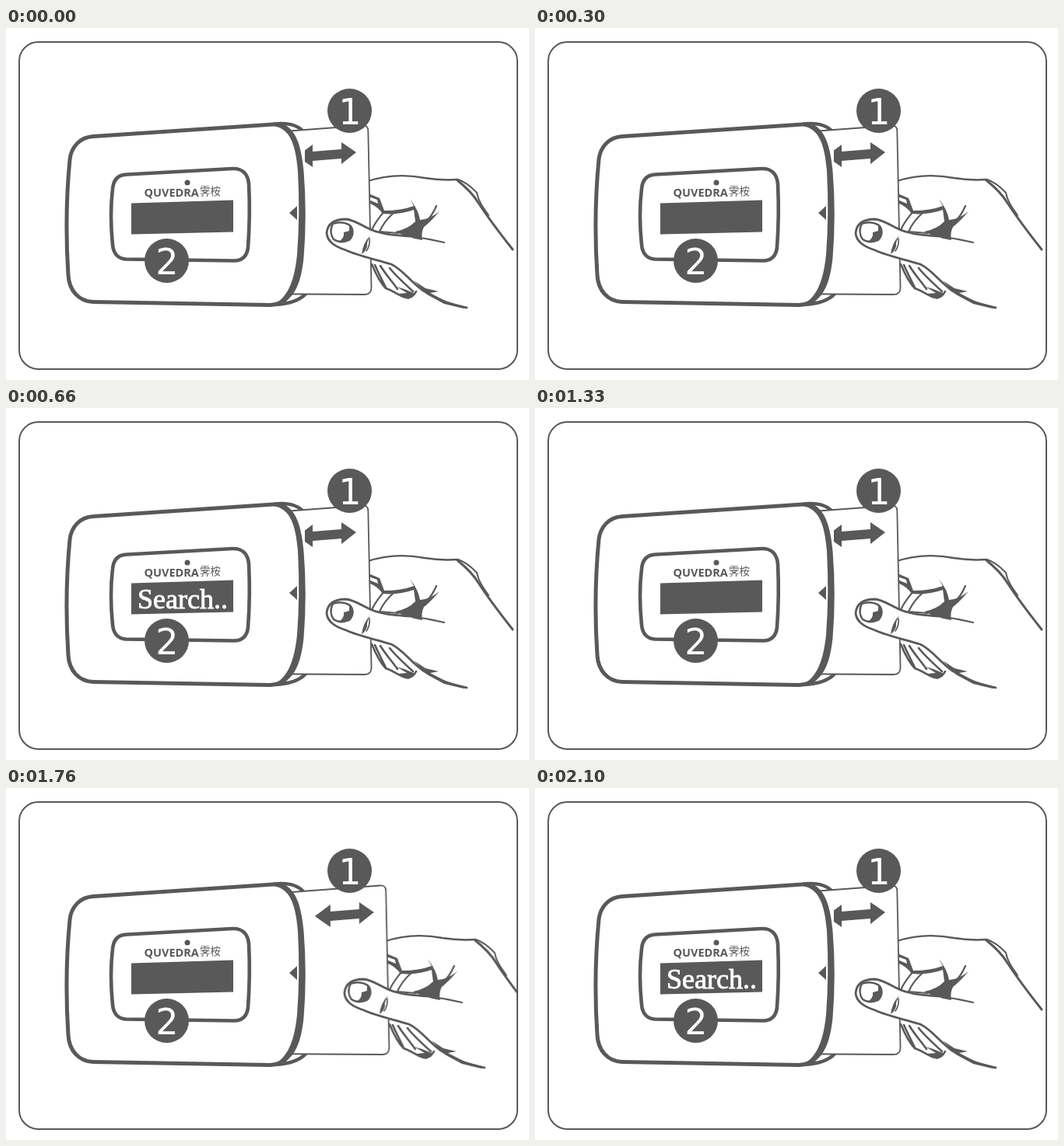
An HTML page for the animation above (2.97 s loop, 672 by 453 pixels).

```html
<!DOCTYPE html>
<html lang="en">
<head>
<meta charset="utf-8">
<title>Card reader guide</title>
<style>
  :root { --ink: #595959; --loop: 2970ms; }
  html, body { margin: 0; width: 100%; height: 100%; overflow: hidden; background: #fff; }
  svg { display: block; width: 100%; height: 100%; }

  .line { fill: none; stroke: var(--ink); stroke-linecap: round; stroke-linejoin: round; }
  .body { fill: #fff; stroke: var(--ink); stroke-linejoin: round; }
  .solid { fill: var(--ink); }
  .digit { font: 46px "DejaVu Sans", Verdana, sans-serif; fill: #fff; text-anchor: middle; }
  .brand { font: bold 14.5px "Open Sans", sans-serif; fill: var(--ink); }
  .brand-cjk { font: 500 13.5px "Noto Sans CJK SC", "Noto Sans CJK", sans-serif; fill: var(--ink); }
  .status {
    font: 36px "Liberation Serif", "Times New Roman", serif;
    fill: #fff; stroke: #fff; stroke-width: .9;
    animation: status var(--loop) -1ms step-end infinite;
  }
  .slide { animation: slide var(--loop) -1ms infinite; }

  /* Two pulls, a pause, then two more; each moves in 30 ms ticks. */
  @keyframes slide {
    0%, 10.101%, 58.2492% { transform: translateX(0); animation-timing-function: steps(5); }
    5.0505%, 15.1515%, 63.2997% { transform: translateX(114px); animation-timing-function: steps(5); }
    20.202% { transform: translateX(0); }
    47.138% { transform: translateX(0); animation-timing-function: steps(5); }
    52.1886% { transform: translateX(114px); animation-timing-function: steps(6); }
    68.3502%, 100% { transform: translateX(0); }
  }
  @keyframes status {
    0%, 44.7811% { opacity: 0; }
    21.2121%, 69.3603% { opacity: .5; }
    22.2222%, 70.7071% { opacity: 1; }
    100% { opacity: 0; }
  }
</style>
</head>
<body>
<svg viewBox="0 0 672 453" preserveAspectRatio="none">
  <defs>
    <clipPath id="stage"><rect width="656" height="453"/></clipPath>
    <clipPath id="slot"><rect x="384" width="272" height="453"/></clipPath>
  </defs>
  <rect width="672" height="453" fill="#fff"/>
  <rect class="line" x="17" y="18" width="640" height="421" rx="24.5" stroke-width="2"/>

  <!-- rear rim -->
  <path class="body" stroke-width="4.5" d="M345 123.500C366 121.500 378 126 386 138L385 342C378 350 363 355 345 356Z"/>

  <g clip-path="url(#stage)">
    <g class="slide">
      <!-- hand behind the card -->
      <path fill="#fff" d="M460 198Q500 186 545 193L578 196L606 213L651 285L592 360L540 342L518 348L474 320Z"/>
      <path class="line" stroke-width="2.400" d="M462 198C488 189 512 188 538 193C556 196 567 196 580 195"/>
      <path class="line" stroke-width="3" d="M580 196C590 204 599 212 607 225C620 245 636 266 651 285"/>
      <path class="line" stroke-width="2" d="M581 195C593 199 600 207 605 212C607 223 613 231 620 241"/>

      <!-- folded fingers -->
      <path class="solid" d="M466 213L480 219L486 235Q508 235 524 229L519 220Q530 234 532 247Q545 246 557 236Q545 250 537 256Q533 264 535 273Q516 270 500 262Q516 259 526 249L524 234Q504 241 484 239Q478 230 466 225V221L478 226L477 221L466 217Z"/>
      <path class="line" stroke-width="2.200" d="M485 237C479 245 474 250 470 260M498 238C490 245 484 253 480 262L504 264M553 229C549 238 545 244 540 249M520 268Q542 271 563 276"/>
      <path class="line" stroke-width="2.600" d="M470 304C475 316 480 327 488 335C498 338 505 345 514 347C521 348 525 343 527 339M481 306C487 316 496 326 503 336M493 309C501 319 512 329 523 339M488 334C483 324 478 314 474 305"/>
      <path class="solid" d="M502 333L512 336L526 342L517 349L504 342L515 341Z"/>

      <!-- card -->
      <path class="body" stroke-width="1.800" d="M230 142.500L458 125.500Q465 125 465.300 132L469.500 334Q469.500 343 461 343L230 341.500Z"/>

      <!-- thumb -->
      <path fill="#fff" d="M412 264C413 252 422 246 437 246C448 247 458 255 470 260C486 266 502 267 520 268L556 338L536 338C520 327 510 311 495 304C472 297 452 293 437 286C422 281 412 275 412 264Z"/>
      <path class="line" stroke-width="2.800" d="M520 268C502 267 486 266 470 260C458 255 448 247 437 246C422 246 413 252 412 264C413 275 422 281 437 286C452 293 472 297 495 304C510 311 520 327 536 338C551 347 566 355 592 360"/>
      <path class="line" stroke-width="2.400" d="M420 252C416 259 417 267 421 272C427 276 434 276 441 273C446 268 447 261 443 255C438 250 427 249 420 252Z"/>
      <path class="solid" d="M441 254Q449 262 444 270Q437 277 427 275Q435 271 434 263L441 261Z"/>
      <path class="solid" d="M468 267Q459 276 457 291Q462 288 464 281Q463 276 468 267Z"/>
      <path class="line" stroke-width="1.600" d="M467 271Q468 280 463 287"/>
      <path class="solid" d="M524 325L539 335L556 339L545 341L566 352L593 359L588 361L563 355L541 343Z"/>
    </g>
  </g>
  <g clip-path="url(#slot)">
    <path class="solid slide" d="M374 165L394 150V159L431 156V147L450 160L431 175V168L394 171V179Z"/>
  </g>

  <!-- device -->
  <path class="body" stroke-width="5" d="M112 139.500L344 124C364 123 375 142 379 184Q382 240 378 296C374 337 362 356 339 356.500L112 352.500C93 352 81 337 80 318Q75 242 82 169C84 153 95 140.500 112 139.500Z"/>
  <path class="solid" d="M344 122C368 121 379 143 382.500 184Q387 240 382.500 296C378 340 364 357 336 359C360 352 370 330 374 292Q378 240 375 184C372 147 364 130 344 126Z"/>
  <path class="solid" d="M364 238L374 229V247Z"/>
  <path class="line" stroke-width="4.600" d="M155 188.500L291 181C304 180.500 311 188 312 201Q314 241 311 282C310 293 304 299.500 293 299.500L154 297.500C144 297 138 290 137 279Q133 240 137 207C138 195 144 189 155 188.500Z"/>

  <circle class="solid" cx="233" cy="199" r="3.500"/>
  <text class="brand" x="177.500" y="216.500">QUVEDRA</text>
  <text class="brand-cjk" x="249" y="214.500">霁桉</text>
  <path class="solid" d="M161 225.500L292 221.500V262.500L161 265.500Z"/>
  <text class="status" x="169" y="257.500">Search..</text>

  <!-- step badges -->
  <circle class="solid" cx="441.500" cy="106.500" r="28.500"/>
  <text class="digit" x="442" y="123.500">1</text>
  <circle class="solid" cx="206.500" cy="299.500" r="28.500"/>
  <text class="digit" x="207" y="316.500">2</text>
</svg>
</body>
</html>
```
